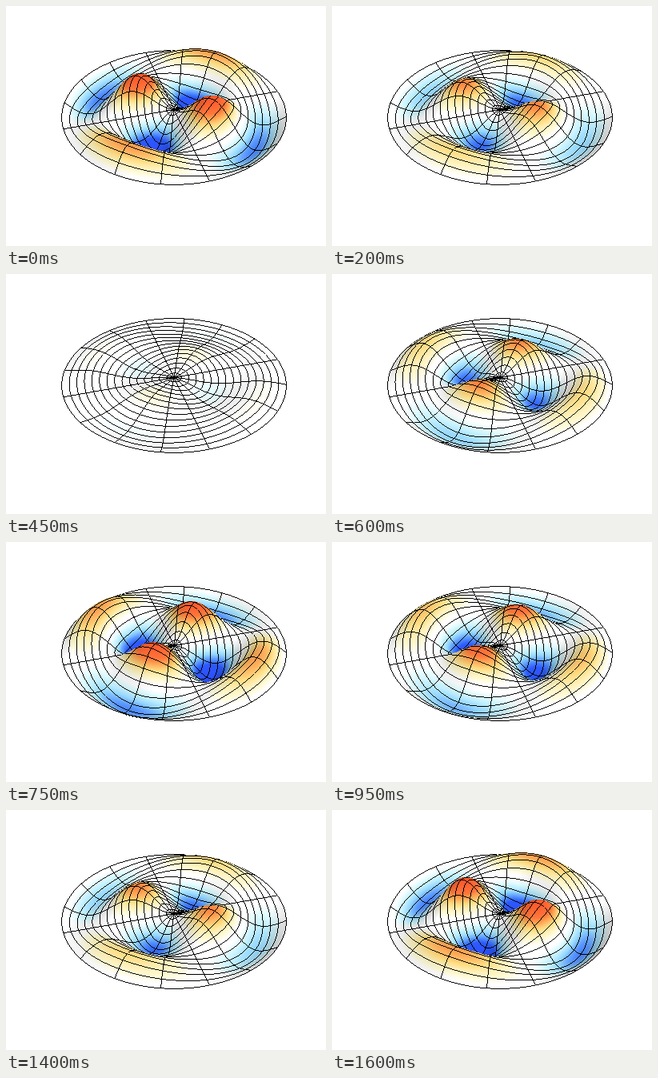
Recreate the animation shown at these times as a matplotlib script. Size 400x300 px, loop 1650 ms.

```python
import numpy as np
import matplotlib.pyplot as plt
from matplotlib.animation import FuncAnimation
from matplotlib.colors import LinearSegmentedColormap

W, H, DPI = 400, 300, 100
FRAMES, INTERVAL = 33, 50

# Surface samples, dense enough to cover every pixel
NR, NA = 300, 1600
RINGS, SPOKES = 15, 16
RING_STEP, SPOKE_STEP = NR // RINGS, NA // SPOKES

# Perspective camera
CENTER = (210, 129.5)
ELEV = np.radians(36.4)
DIST, FOCAL = 6.77, 943
SIN, COS = np.sin(ELEV), np.cos(ELEV)
LINE_BIAS = 0.05

# Mode (2, 2) of a circular drum
ROOT = 8.41724
AMPLITUDE = 0.5
PHASE = np.radians(-28.5)

LIGHT = (0.35, -0.5, 0.79)
AMBIENT, DIFFUSE = 0.7, 0.38

COLORS = LinearSegmentedColormap.from_list("drum", [
    (0.00, "#2d50ff"), (0.13, "#2d5aff"), (0.18, "#4b87ff"),
    (0.27, "#96d7ff"), (0.33, "#beeeff"), (0.40, "#e1fcff"),
    (0.46, "#ffffff"), (0.54, "#ffffff"), (0.60, "#fffbd7"),
    (0.67, "#ffefb4"), (0.73, "#ffdc82"), (0.82, "#ffa050"),
    (0.87, "#ff783c"), (1.00, "#ff5a2d")], N=512)


def bessel2(x):
    tau = (np.arange(200) + 0.5) * np.pi / 200
    return np.cos(2 * tau - x[..., None] * np.sin(tau)).mean(axis=-1)


r = np.linspace(0, 1, NR + 1)[:, None]
theta = np.linspace(0, 2 * np.pi, NA + 1)[None, :]
C, S = np.cos(theta + PHASE), np.sin(theta + PHASE)
X, Y = r * C, r * S

profile = AMPLITUDE * bessel2(ROOT * r)
SHAPE = profile * np.cos(2 * theta)
Z_MAX = np.abs(SHAPE).max()

# Slopes of the surface at full swing
slope_r = np.gradient(profile, 1 / NR, axis=0) * np.cos(2 * theta)
slope_t = -2 * profile / np.maximum(r, 1e-6) * np.sin(2 * theta)
SLOPE_X = slope_r * C - slope_t * S
SLOPE_Y = slope_r * S + slope_t * C


def project(z):
    depth = DIST + Y * COS - z * SIN
    sx = CENTER[0] + FOCAL * X / depth
    sy = CENTER[1] - FOCAL * (Y * SIN + z * COS) / depth
    return np.stack([sx, sy, depth], axis=-1)


def shaded(swing):
    gx, gy = swing * SLOPE_X, swing * SLOPE_Y
    facing = LIGHT[2] - gx * LIGHT[0] - gy * LIGHT[1]
    facing /= np.sqrt(1 + gx ** 2 + gy ** 2)
    light = np.minimum(AMBIENT + DIFFUSE * np.maximum(facing, 0), 1)
    rgb = COLORS(0.5 + 0.5 * swing * SHAPE / Z_MAX)[..., :3]
    return rgb * light[..., None]


def segments(lines, step):
    pts = lines[:, ::step]
    return pts[:, :-1].reshape(-1, 3), pts[:, 1:].reshape(-1, 3)


def line_pixels(a, b):
    """One pixel per step along the longer axis of each segment."""
    d = b - a
    rows = np.arange(len(a))
    major = np.abs(d[:, :2]).argmax(axis=1)
    start, run = a[rows, major], d[rows, major]
    run = np.where(run == 0, 1e-9, run)
    low, high = np.minimum(start, start + run), np.maximum(start, start + run)
    steps = np.arange(int(np.abs(run).max()) + 2)
    m = np.ceil(low - 0.5)[:, None] + steps + 0.5
    seg, k = np.nonzero(m < high[:, None])
    t = (m[seg, k] - start[seg]) / run[seg]
    p = a[seg] + t[:, None] * d[seg]
    px, py = np.floor(p[:, :2] + 1e-9).astype(int).T
    return px, py, p[:, 2]


def render(swing):
    p = project(swing * SHAPE)
    image = np.ones((H, W, 3))
    nearest = np.full((H, W), np.inf)

    # Far samples first, so that near ones overwrite them
    flat = p.reshape(-1, 3)
    order = np.argsort(-flat[:, 2])
    px, py = flat[order, :2].astype(int).T
    image[py, px] = shaded(swing).reshape(-1, 3)[order]
    nearest[py, px] = flat[order, 2]

    rings = segments(p[RING_STEP::RING_STEP], 10)
    spokes = segments(p[:, :-1:SPOKE_STEP].swapaxes(0, 1), 5)
    for a, b in (rings, spokes):
        px, py, depth = line_pixels(a, b)
        seen = depth - LINE_BIAS < nearest[py, px]
        image[py[seen], px[seen]] = 0
    return image


# The second half of the swing mirrors the first
HALF = (FRAMES - 1) // 2
images = [render(np.cos(np.pi * i / HALF)) for i in range(HALF + 1)]

fig = plt.figure(figsize=(W / DPI, H / DPI), dpi=DPI, facecolor="white")
ax = fig.add_axes([0, 0, 1, 1])
ax.axis("off")
picture = ax.imshow(images[0], interpolation="nearest", aspect="auto")


def update(i):
    picture.set_data(images[min(i, FRAMES - 1 - i)])
    return (picture,)


anim = FuncAnimation(fig, update, frames=FRAMES, interval=INTERVAL,
                     repeat=True, repeat_delay=0)
plt.show()
```
